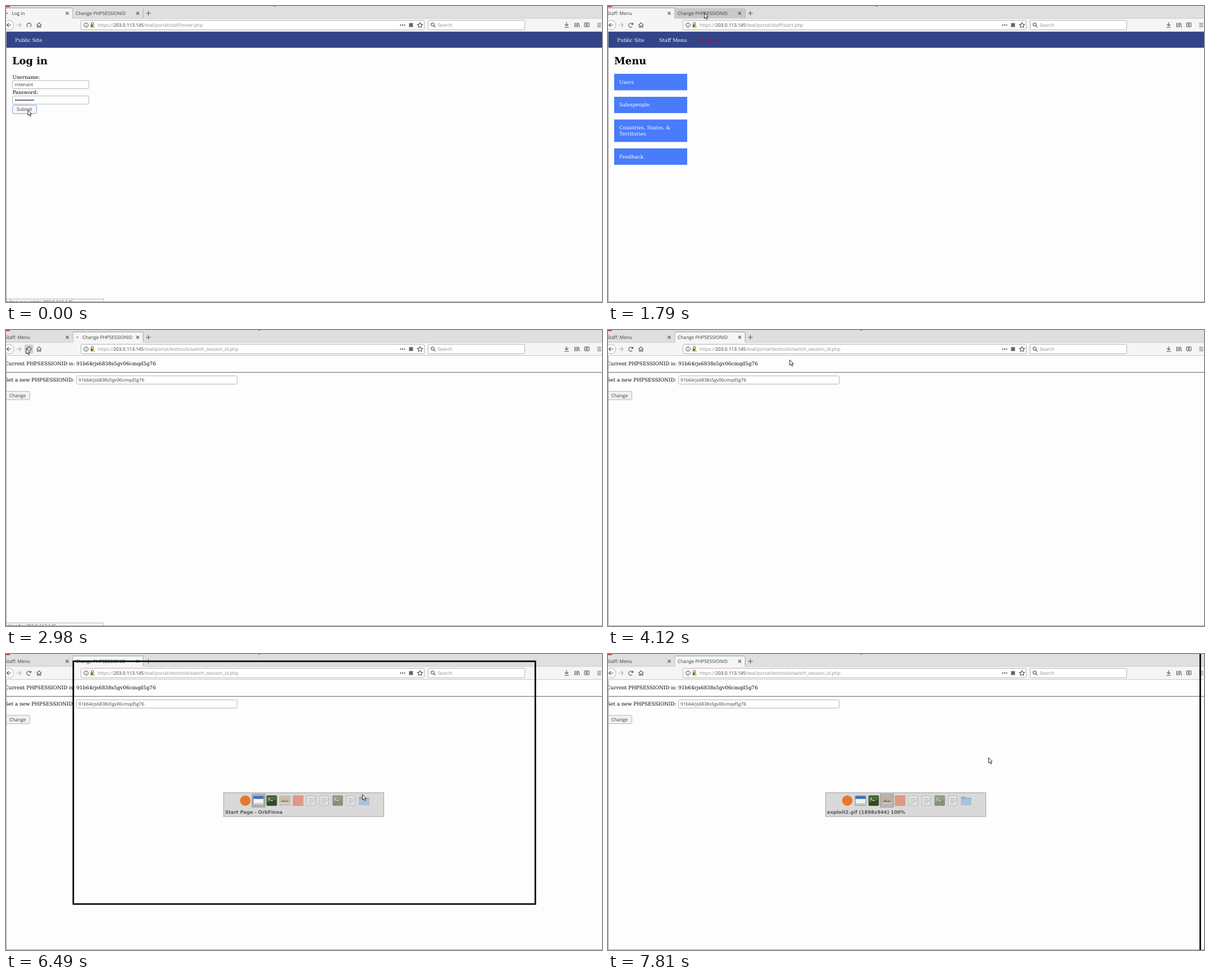
An HTML page for the animation above (8 s loop, 1061 by 528 pixels).

```html
<!DOCTYPE html>
<html lang="en">
<head>
<meta charset="utf-8">
<title>Session demo</title>
<style>
  html, body { margin: 0; width: 100%; height: 100%; overflow: hidden; background: #fdfdfd; }
  svg { display: block; width: 1061px; height: 528px; text-rendering: geometricPrecision; }
  .ui { font: 8.3px "Open Sans", sans-serif; fill: #3c3c3c; }
  .serif { font: 8.85px "DejaVu Serif", serif; }
  .h1 { font: bold 17.9px "DejaVu Serif", serif; }
  .caption { font: bold 8.35px "DejaVu Sans", sans-serif; fill: #5a5a5a; }
  .muted { fill: #8b8b8b; }
  .field { fill: #fff; stroke: #b4b4b4; }
  .line { fill: none; stroke: #555; stroke-width: 1.1; }
  .item { fill: #487cfb; }
  .item.hover { fill: #3c6fe0; }
</style>
</head>
<body>
<svg viewBox="0 0 1061 528">
  <defs>
    <path id="close" class="line" d="M-2.5-2.5l5 5m0-5l-5 5"/>
    <g id="window">
      <rect x="-9.5" y="-8.5" width="19" height="17" rx="1" fill="#f2f3f5" stroke="#6d7b92"/>
      <path d="M-9-8H9V-3H-9z" fill="#3f6fb5"/><path d="M-8 6H8" stroke="#c5cad2" stroke-width="3"/>
    </g>
    <g id="terminal">
      <rect x="-9" y="-9" width="18" height="18" rx="1.5" fill="#2f4a24" stroke="#5c6656"/>
      <path d="M-8-8H8V-1Q0-2-8 4z" fill="#4b6c3b"/>
      <path d="M-6-5l3 2-3 2M-2 0h4" fill="none" stroke="#fff"/>
    </g>
    <g id="picture">
      <rect x="-9" y="-8" width="18" height="16" fill="#e8e2d5" stroke="#777"/>
      <path d="M-8-7H8V3H-8z" fill="#c2a06c"/><path d="M-8 3l5-5 4 3 3-2 4 4z" fill="#5d4630"/>
      <path d="M-8 6H8" stroke="#666" stroke-dasharray="2 1"/>
    </g>
    <g id="note">
      <rect x="-8" y="-8.5" width="15" height="17" fill="#f4f4f4" stroke="#8d8d8d"/>
      <path d="M-5-4H4M-5-1H3M-5 2H1M-5 5H0M0 5L8-4" stroke="#777" fill="none"/>
    </g>
    <g id="folder">
      <path d="M-9-7h7l2 2H9V8H-9z" fill="#4c84bd"/><rect x="-9" y="-3" width="18" height="11" rx="1" fill="#77aee0"/>
    </g>
  </defs>

  <rect width="1061" height="528" fill="#fdfdfd"/>

  <g id="chrome">
    <rect width="1061" height="22" fill="#dfdfdf"/>
    <rect width="7" height="2" fill="#b8443a"/>
    <rect id="speck" y="0" width="4" height="1" fill="#777"/>
    <rect id="tabHover" x="119" y="4" width="125" height="18" fill="#c9c9c9"/>
    <path d="M244.5 5V21" stroke="#b5b5b5"/>
    <rect y="22" width="1061" height="23.5" fill="#f5f5f5"/>
    <path d="M0 22H1061M0 45.5H1061" stroke="#c8c8c8"/>
    <g id="activeTab">
      <rect y="3" height="20" width="100%" fill="#f5f5f5"/>
    </g>
    <rect id="burst" y="4" height="18" fill="#a5cdf4"/>
    <circle id="dot" cy="13" r="1.1" fill="#456"/>
    <g class="ui">
      <text id="title1" y="16"></text>
      <text id="title2" y="16">Change PHPSESSIONID</text>
    </g>
    <use href="#close" x="109" y="13"/><use href="#close" x="234.5" y="13"/>
    <path class="line" d="M249.5 13h8m-4-4v8"/>

    <circle cx="5.5" cy="34" r="8.5" fill="#fff" stroke="#b0b0b0"/>
    <path class="line" d="M9.5 34H1.5m3.5-3.5L1.500 34l3.500 3.500"/>
    <path class="line" style="stroke:#b0b0b0" d="M19 34h8m-3.500-3.500L27 34l-3.500 3.500"/>
    <rect id="reloadHover" x="33" y="26" width="15.500" height="16" rx="2" fill="#cfcfcf"/>
    <path id="reloadArc" class="line" d="M43 37a3.700 3.700 0 1 1 1-4"/>
    <path id="reloadTip" d="M45 29.500v4h-4z" fill="#555"/>
    <path id="loadingArc" class="line" d="M39 37.200a3.700 3.700 0 1 1 4 0"/>
    <path id="stop" class="line" style="stroke:#aaa" d="M37.500 30.500l7 7m0-7l-7 7"/>
    <path class="line" d="M54.500 34.200l4.300-4.200 4.300 4.200M55.800 33.500V38h2v-2.500h2V38h2v-4.500"/>

    <rect class="field" x="133.500" y="25.500" width="611" height="17" rx="2"/>
    <circle class="line" cx="142.500" cy="34" r="3.800"/><path class="line" d="M142.500 33.500v2.500M142.500 31.500v1"/>
    <path class="line" d="M151.800 33v-1.500a2 2 0 0 1 4 0V33"/><rect x="150.800" y="33" width="5" height="5" fill="#666"/>
    <path d="M155.500 33.500l3 5h-6z" fill="#f0b429"/>
    <text class="ui muted" x="163" y="37">https://<tspan fill="#333">203.0.113.145</tspan><tspan id="path"></tspan></text>
    <path d="M701.500 34h9" stroke="#555" stroke-width="2" stroke-dasharray="2 1.500"/>
    <rect x="717.500" y="30.500" width="7" height="7" fill="#666"/>
    <path class="line" d="M737 29.500l1.400 2.900 3.200.4-2.300 2.200.6 3.200-2.900-1.600-2.900 1.600.6-3.200-2.300-2.200 3.200-.4z"/>
    <rect class="field" x="751.500" y="25.500" width="172" height="17" rx="2"/>
    <circle class="line" cx="759.500" cy="33" r="2.800"/><path class="line" d="M761.500 35l3 3"/>
    <text class="ui muted" x="768.500" y="37">Search</text>
    <path class="line" d="M998 29v6.500m-3-3l3 3 3-3M994 38h8"/>
    <path class="line" d="M1012.500 30v8M1015 30v8M1017.500 30v8M1019 30l2 8"/>
    <rect class="line" x="1030" y="30" width="8" height="7" rx="1"/><path class="line" d="M1032 32.500h2m-2 2h2M1034.500 30v7"/>
    <path class="line" d="M1052.500 31h7m-7 3h7m-7 3h7"/>
  </g>

  <g id="nav" class="serif" fill="#fff">
    <rect y="46" width="1061" height="28.500" fill="#334488"/>
    <text x="16" y="64">Public Site</text>
    <g id="staffNav"><text x="91" y="64">Staff Menu</text><text x="167" y="64" fill="#d0021b">Log out</text></g>
  </g>

  <g id="login" class="serif">
    <text class="h1" x="11" y="103.500">Log in</text>
    <text x="11.500" y="129.500">Username:</text><text x="11.500" y="157">Password:</text>
    <rect class="field" x="11.500" y="133" width="136" height="14.500" rx="2"/>
    <rect class="field" x="11.500" y="160.500" width="136" height="14.500" rx="2"/>
    <text class="ui" x="15.500" y="143.200">mtenant</text>
    <path d="M17.200 168H50" stroke="#333" stroke-width="2.300" stroke-linecap="round" stroke-dasharray="0 2.850"/>
    <rect x="11.500" y="177" width="43" height="15" rx="2.500" fill="#f5f7fa" stroke="#6ea3dc"/>
    <text class="ui" x="19" y="187.300">Submit</text>
  </g>

  <g id="menu" class="serif" fill="#fff">
    <text class="h1" x="11" y="103.500" fill="#000">Menu</text>
    <rect id="users" class="item" x="11" y="121" width="130" height="29.300"/>
    <rect id="sales" class="item" x="11" y="162" width="130" height="29"/>
    <rect class="item" x="11" y="202.500" width="130" height="40"/>
    <rect class="item" x="11" y="254" width="130" height="29.300"/>
    <text x="20" y="138.500">Users</text><text x="20" y="179.200">Salespeople</text>
    <text x="20" y="220">Countries, States, &amp;</text><text x="20" y="231">Territories</text>
    <text x="20" y="271.700">Feedback</text>
  </g>

  <g id="session" class="serif">
    <text x="-2" y="63.300">Current PHPSESSIONID is: 91b64rjs6838s5gv06cmqd5g76</text>
    <path d="M0 75.500H1061" stroke="#666"/>
    <text x="-1.700" y="92">Set a new PHPSESSIONID:</text>
    <rect class="field" x="125.500" y="81.800" width="286" height="14.700" rx="2"/>
    <text class="ui" style="font-size:8.100px" x="129" y="92">91b64rjs6838s5gv06cmqd5g76</text>
    <rect x="-4" y="109.300" width="46.500" height="15" rx="2.500" fill="#f1f1f1" stroke="#b4b4b4"/>
    <text class="ui" x="6" y="119.700">Change</text>
  </g>

  <g id="status">
    <rect x="-1" y="522.500" width="174.500" height="8" fill="#f4f4f4" stroke="#bbb"/>
    <text id="statusText" class="ui" y="531" text-anchor="end"></text>
  </g>
  <path d="M.5 46V528M0 527.500H1061" stroke="#a5a5a5" fill="none"/>

  <rect id="outline" fill="none" stroke="#000" stroke-width="2.700"/>
  <g id="switcher">
    <rect x="387.500" y="247.500" width="285" height="42.500" fill="#d9d9d9" stroke="#a0a0a0"/>
    <rect id="chosen" y="250" width="23" height="23" fill="#c0c0c0" stroke="#858585"/>
    <circle cx="426" cy="261.500" r="9.300" fill="#e8772a"/>
    <use href="#window" x="449.500" y="261.500"/><use href="#terminal" x="473" y="261.500"/>
    <g opacity=".5">
      <use href="#picture" x="496.500" y="261.500"/>
      <rect x="510.500" y="252" width="19" height="19" fill="#e25a35"/>
      <use href="#note" x="543.500" y="261.500"/><use href="#note" x="567" y="261.500"/>
      <use href="#terminal" x="590.500" y="261.500"/><use href="#note" x="614" y="261.500"/>
      <use href="#folder" x="637.500" y="261.500"/>
    </g>
    <text id="caption" class="caption" x="390" y="284.500"></text>
  </g>

  <g id="cursor">
    <path id="arrow" d="M0 0V9.700L2.200 7.700 3.900 11.300 5.500 10.500 3.900 7.100H6.700z" fill="#fff" stroke="#111" stroke-width=".9"/>
    <path id="hand" d="M0 .5q1.300-1 1.700.5l.6 2.500 4.500.8q1.400.5 1.200 2l-.5 3.700H2L-1.500 6q0-1.300 2 0z" fill="#fff" stroke="#222" stroke-width=".9"/>
  </g>
</svg>
<script>
const LOOP = 8000;
const el = id => document.getElementById(id);
const show = (id, on) => { el(id).style.display = on ? '' : 'none'; };
const set = (id, attrs) => { for (const k in attrs) el(id).setAttribute(k, attrs[k]); };
const text = (id, value) => { if (el(id).textContent !== value) el(id).textContent = value; };

// time, x, y of the pointer tip
const route = [
  [0, 39, 185.5], [270, 39, 185.5], [530, 75, 173], [770, 106, 149.5], [1030, 132, 105],
  [1190, 132, 105], [1640, 171.5, 12.5], [2210, 171.5, 12.5], [2690, 36, 33], [3500, 36, 33],
  [3970, 160, 60], [4500, 734, 36], [5110, 234, 139], [5230, 250, 155], [5620, 436.5, 317.5],
  [5900, 590, 416], [6150, 700, 340], [6350, 634.5, 250.500], [7420, 634.5, 250.500], [7700, 677.5, 184.800], [LOOP, 677.5, 184.800]
];

// start time, icon column, caption, outline x, y, width, height
const windows = [
  [6350, 1, 'Start Page - OrbFinna', 119.800, 13, 822.500, 433],
  [7000, 2, 'Terminal', 194.500, 60, 560, 370],
  [7420, 3, 'exploit2.gif (1898x944) 100%', -10, -10, 1064.300, 550]
];

function pointer(t) {
  const i = route.findIndex(p => p[0] > t);
  const [t0, x0, y0] = route[i - 1], [t1, x1, y1] = route[i];
  const k = (t - t0) / (t1 - t0);
  return [x0 + (x1 - x0) * k, y0 + (y1 - y0) * k];
}

function draw(t) {
  const login = t < 400, session = t >= 1940, menu = !login && !session;
  const reloading = t >= 2820 && t < 3450;
  const spinning = t < 550 || reloading;
  show('login', login);
  show('menu', menu);
  show('session', session);
  show('nav', !session);
  show('staffNav', menu);

  set('activeTab', { transform: session ? 'translate(119 0)' : '' });
  const tabWidth = session ? 125 : 118.5;
  el('activeTab').innerHTML = `<rect y="3" width="${tabWidth}" height="20" fill="#f5f5f5"/>` +
    `<path d="M0 3.500H${tabWidth}" stroke="#84a4b8"/><path d="M0 4V22M${tabWidth} 4V22" stroke="#bbb"/>`;
  show('tabHover', t >= 1560 && !session);
  text('title1', login ? 'Log in' : 'Staff: Menu');
  set('title1', { x: t < 1030 ? 10.5 : -1.5 });
  set('title2', { x: reloading ? 136 : 124 });
  set('speck', { x: session ? 449 : 476 });
  const burst = t >= 650 && t < 950;
  show('burst', burst);
  if (burst) set('burst', { x: 0, width: Math.min(118, (t - 650) * 0.29) });
  show('dot', spinning);
  set('dot', { cx: (session ? 127 : 2) + 3 * Math.sin((t - (session ? 2980 : 0)) / 130) });

  const stop = t >= 270 && t < 1000 || t >= 3110 && t < 3450;
  const turning = spinning && !stop;
  show('stop', stop);
  show('loadingArc', turning);
  show('reloadArc', !stop && !turning);
  show('reloadTip', !stop && !turning);
  show('reloadHover', t >= 2600 && t < 3600);
  text('path', '/teal/portal/' + (session ? 'testtools/switch_session_id.php' : login ? 'staff/enter.php' : 'staff/start.php'));
  show('status', login || reloading);
  text('statusText', (login ? 'Sending request to' : 'Waiting for') + ' 203.0.113.145…');
  set('statusText', { x: login ? 126 : 96 });

  el('sales').classList.toggle('hover', t >= 430 && t < 830);
  el('users').classList.toggle('hover', t >= 830 && t < 930);
  const hand = t >= 430 && t < 930;
  show('hand', hand);
  show('arrow', !hand);
  set('cursor', { transform: `translate(${pointer(t)})` });

  const pick = windows.filter(w => w[0] <= t).pop();
  show('switcher', pick);
  show('outline', pick);
  if (pick) {
    const [, column, caption, x, y, width, height] = pick;
    set('chosen', { x: 414.5 + column * 23.5 });
    text('caption', caption);
    set('outline', { x, y, width, height });
  }
}

function tick() {
  draw(performance.now() % LOOP);
  requestAnimationFrame(tick);
}
tick();
</script>
</body>
</html>
```
